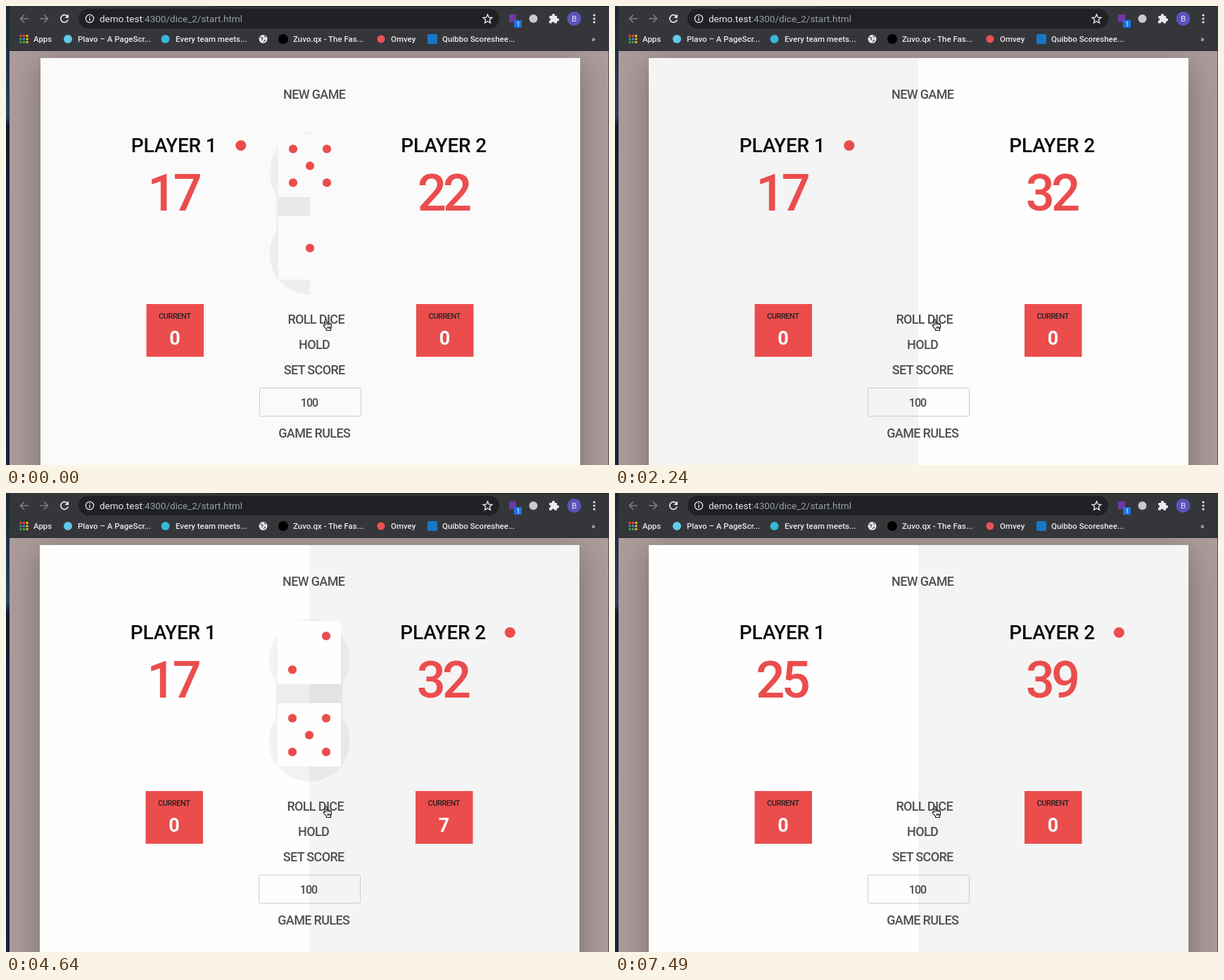
Animation, 857 px wide and 653 px high, one loop 8000 ms. Source, as an HTML page:

```html
<!DOCTYPE html>
<html lang="en">
<head>
<meta charset="utf-8">
<title>Dice game</title>
<style>
  html, body { margin: 0; width: 100%; height: 100%; overflow: hidden; }
  svg { display: block; width: 857px; height: 653px; }
  text { font-family: Roboto, "Liberation Sans", sans-serif; white-space: pre; }
  #game text { text-anchor: middle; font-weight: 500; }
  #game text.bold { font-weight: 700; }
  #bar text { font-size: 11.5px; font-weight: 500; fill: #e8eaed; }
  .line { fill: none; stroke: #e8eaed; stroke-width: 1.7; }
</style>
</head>
<body>
<svg viewBox="0 0 857 653">
  <defs>
    <linearGradient id="desk" x2="0" y2="1">
      <stop offset="0" stop-color="#172537"/>
      <stop offset=".24" stop-color="#26405a"/>
      <stop offset=".26" stop-color="#101c2e"/>
      <stop offset="1" stop-color="#14243b"/>
    </linearGradient>
    <filter id="blur" x="-20%" y="-20%" width="140%" height="140%"><feGaussianBlur stdDeviation="22"/></filter>
    <clipPath id="leftHalf"><rect width="431" height="653"/></clipPath>
    <clipPath id="page"><rect x="5" y="64" width="851" height="589"/></clipPath>
  </defs>
  <rect width="857" height="653" fill="#584f50"/>
  <rect width="5" height="653" fill="url(#desk)"/>
  <g clip-path="url(#page)">
    <rect x="5" y="64" width="851" height="589" fill="#d9d3d2"/>
    <g id="game"></g>
  </g>
  <g id="bar">
    <rect x="5" width="852" height="64" fill="#35363a"/>
    <rect x="295" width="562" height="1" fill="#202124"/>
    <rect x="5" y="63" width="852" height="1" fill="#28292c"/>
    <rect x="103" y="4" width="598" height="28" rx="14" fill="#202124"/>
    <path class="line" style="stroke:#7d7e82" d="M32 18H20.500M26 12.500L20.500 18L26 23.500M48 18H59.500M54 12.500L59.500 18L54 23.500"/>
    <path class="line" d="M87 14.300A5.300 5.300 0 1 0 88.200 19.500"/>
    <path fill="#e8eaed" d="M89 11.500V17H83.500Z"/>
    <circle class="line" cx="119" cy="18" r="5.600" style="stroke-width:1.300"/>
    <path class="line" style="stroke-width:1.400" d="M119 17V21.300M119 14.500V16"/>
    <text x="133" y="23" style="font-size:13.5px;font-weight:400">demo.test<tspan fill="#9aa0a6">:4300/dice_2/start.html</tspan></text>
    <path class="line" style="stroke-width:1.400" d="M684.500 12L686.300 16.200L690.800 16.600L687.400 19.600L688.400 24L684.500 21.700L680.600 24L681.600 19.600L678.200 16.600L682.700 16.200Z"/>
    <rect x="715" y="12" width="10" height="11" fill="#7038a0"/>
    <rect x="722" y="20" width="11" height="11" rx="2" fill="#1a73e8"/>
    <text x="725.500" y="29" style="font-size:8.5px">1</text>
    <circle cx="749.500" cy="18" r="6" fill="#c9cacd"/>
    <path fill="#e8eaed" d="M773 14H776A2.200 2.200 0 1 1 780 14H783V17.500A2.200 2.200 0 1 1 783 21.500V24.500H779.500A2 2 0 1 0 775.500 24.500H772V21A2 2 0 1 0 772 17V15Z"/>
    <circle cx="807.500" cy="18" r="10" fill="#5c53bd"/>
    <text x="807.500" y="22" text-anchor="middle" style="font-weight:400">B</text>
    <g fill="#e8eaed"><circle cx="836" cy="13" r="1.600"/><circle cx="836" cy="18" r="1.600"/><circle cx="836" cy="23" r="1.600"/></g>
    <g id="apps"></g>
    <circle cx="88" cy="47" r="6" fill="#61cbe8"/>
    <circle cx="226.500" cy="47" r="6" fill="#36b8d8"/>
    <circle cx="365.500" cy="47" r="6" fill="#e8eaed"/>
    <path class="line" style="stroke:#46474b;stroke-width:1.300" d="M361 44L365 46L363 49M367 42L369 45M366 51L369 48"/>
    <circle cx="394" cy="47" r="7" fill="#000"/>
    <circle cx="533" cy="47" r="5.500" fill="#ec5252"/>
    <rect x="599" y="40" width="14" height="14" rx="2" fill="#1677c8"/>
    <text x="39" y="51">Apps</text>
    <text x="102" y="51">Plavo – A PageScr...</text>
    <text x="241" y="51">Every team meets...</text>
    <text x="408" y="51">Zuvo.qx - The Fas...</text>
    <text x="547" y="51">Omvey</text>
    <text x="620" y="51">Quibbo Scoreshee...</text>
    <text x="832" y="51">»</text>
  </g>
  <path transform="translate(449.500 445)" fill="#fff" stroke="#111" stroke-width="1.100" stroke-linejoin="round"
    d="M4 9V2Q4 .7 5.100 .7T6.300 2V6Q7.500 5 8.600 6.300Q9.900 5.500 10.800 7Q12.800 6.400 13 8.500V11.500Q13 13 12 14.500V16.500H6V14.800L2 10.600Q1 8.800 2.300 8.500T4 9.800M6.400 6V9M8.700 6.500V9M10.900 7V9.300M7.500 11V14M9.300 11V14M11 11V14"/>
</svg>
<script>
const LOOP = 8000, RED = '#eb4d4d', GRAY = '#f4f4f4', WHITE = '#fefefe';

// Each step changes only the listed parts of the previous state.
const steps = [
  { at: 0, active: 0, scores: [17, 22], current: [0, 0], dice: [5, 1], dx: 1, dy: 0, fading: true },
  { at: 290, dx: 0, fading: false },
  { at: 440, active: 1, dice: [] },
  { at: 1190, dice: [6, 4], current: [0, 10] },
  { at: 2240, active: 0, dice: [], scores: [17, 32], current: [0, 0] },
  { at: 2840, dice: [1, 6] },
  { at: 2990, dy: 1 },
  { at: 4040, active: 1, dice: [] },
  { at: 4490, dy: 0 },
  { at: 4640, dice: [2, 5], current: [0, 7] },
  { at: 5690, active: 0, dice: [], scores: [17, 39], current: [0, 0] },
  { at: 6440, dice: [2, 6], current: [8, 0] },
  { at: 7490, active: 1, dice: [], scores: [25, 39], current: [0, 0] }
];

const menu = [
  ['NEW GAME', 437.5, 132], ['ROLL DICE', 440, 452], ['HOLD', 437.5, 488],
  ['SET SCORE', 437.5, 524], ['GAME RULES', 437.5, 614]
];

const rect = (x, y, w, h, fill, extra = '') =>
  `<rect x="${x}" y="${y}" width="${w}" height="${h}" fill="${fill}" ${extra}/>`;
const circle = (x, y, r, fill) => `<circle cx="${x}" cy="${y}" r="${r}" fill="${fill}"/>`;
// The shift cancels the spacing after the last letter.
const label = (str, x, y, size, fill, spacing, cls = '') =>
  `<text class="${cls}" x="${x + spacing / 2}" y="${y}" font-size="${size}" fill="${fill}" letter-spacing="${spacing}">${str}</text>`;

function pips(n, top) {
  const spots = [];
  if (n % 2) spots.push([0, 0]);
  if (n > 1) spots.push([1, -1], [-1, 1]);
  if (n > 3) spots.push([-1, -1], [1, 1]);
  if (n === 6) spots.push([-1, 0], [1, 0]);
  return spots.map(([x, y]) => circle(431 + x * 24, top + 45.4 + y * 24, 6.1, RED)).join('');
}

function diceView({ dice, fading }) {
  if (!dice.length) return '';
  const tops = [182, 299];
  const shadow = circle(431, 237, 57.5, '#000') + circle(431, 353, 57.5, '#000') +
    rect(383, 264, 96, 62, '#000');
  return `<g opacity=".042" ${fading ? 'clip-path="url(#leftHalf)"' : ''}>${shadow}</g>` +
    `<g opacity=".02" ${fading ? 'clip-path="url(#leftHalf)"' : ''}>${rect(386, 272, 90, 27, '#000')}</g>` +
    dice.map((n, i) => rect(386, tops[i], 90, 90, fading ? '#fafafa' : WHITE) + pips(n, tops[i])).join('');
}

function playerView(state, i) {
  const left = i * 383.5;
  return label('PLAYER ' + (i + 1), 237.7 + left, 208, 28, '#0c0c0c', -0.2) +
    label(state.scores[i], 239 + left, 291, 72.5, RED, -5) +
    rect(198.5 + left, 424, 81.5, 75, RED) +
    label('CURRENT', 239 + left, 445, 11, '#2a2020', -0.45) +
    label(state.current[i], 239 + left, 482, 27, '#fafafa', -1.8, 'bold') +
    (state.active === i ? circle(332.8 + left, 198.5, 7.6, RED) : '');
}

function gameView(state) {
  const half = i => state.fading ? '#fafafa' : state.active === i ? GRAY : WHITE;
  return `<g transform="translate(${state.dx} ${state.dy})">` +
    rect(0, 64, 857, 600, '#ab9b9a') +
    rect(48, 84, 767, 700, '#000', 'opacity=".3" filter="url(#blur)"') +
    rect(48, 74, 383, 600, half(0)) + rect(431, 74, 384, 600, half(1)) +
    diceView(state) + playerView(state, 0) + playerView(state, 1) +
    menu.map(([str, x, y]) => label(str, x, y, 18, '#505050', -0.65)).join('') +
    rect(359.5, 543.5, 144, 40, 'none', 'rx="2" stroke="#ccc"') +
    label(100, 430.5, 569.5, 16, '#4c4c4c', -1) + '</g>';
}

const appColors = ['#ea4335', '#ea4335', '#fbbc04', '#34a853', '#4285f4', '#fbbc04', '#34a853', '#34a853', '#fbbc04'];
document.getElementById('apps').innerHTML = appColors.map((c, i) =>
  rect(19.5 + i % 3 * 4.5, 41 + Math.floor(i / 3) * 4.5, 3, 3, c)).join('');

const game = document.getElementById('game');
let shown = -1;
function draw() {
  const time = performance.now() % LOOP;
  const index = steps.findLastIndex(s => s.at <= time);
  if (index !== shown) {
    shown = index;
    game.innerHTML = gameView(Object.assign({}, ...steps.slice(0, index + 1)));
  }
  requestAnimationFrame(draw);
}
draw();
</script>
</body>
</html>
```
